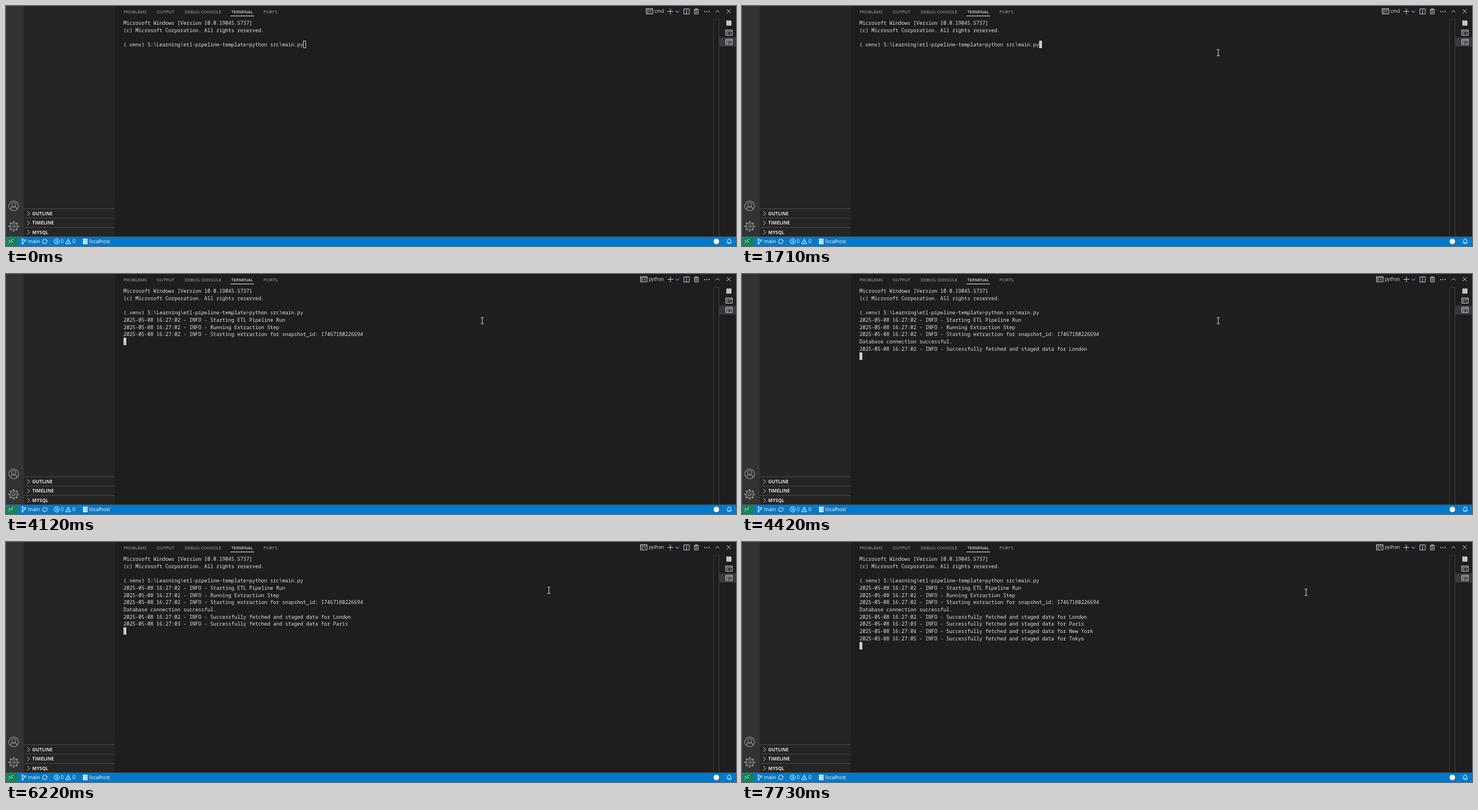
An HTML page that plays this animation: 1280x422 px, repeating every 8 s.

```html
<!DOCTYPE html>
<html lang="en">
<head>
<meta charset="utf-8">
<title>Terminal run</title>
<style>
html, body { margin: 0; width: 100%; height: 100%; overflow: hidden; background: #1e1e1e; }
svg { display: block; width: 100vw; height: 100vh; }
text { font-family: "Open Sans", "Noto Sans", sans-serif; }
.mono text { font: 500 8.75px "Noto Sans Mono", monospace; fill: #e2e2e2; white-space: pre; }
.tabs { font-size: 7.9px; fill: #adadad; }
.sections { font-size: 8.1px; font-weight: 700; fill: #dcdcdc; }
.status { font-size: 8.7px; fill: #fff; }
.line { fill: none; stroke: #d0d0d0; stroke-width: 1; }
.white { stroke: #fff; }
.dim { stroke: #8c8c8c; stroke-width: 1.3; }
</style>
</head>
<body>
<svg viewBox="0 0 1280 422" preserveAspectRatio="none">
  <defs>
    <g id="console" class="line">
      <path d="M.5 .5H12V10H.5ZM.5 2.8H12"/>
      <path d="M4.8 5H2.8V8H4.8M6.3 5V6M6.3 7.2V8.2M7.8 4.6L9.6 8.4" stroke-width=".9"/>
    </g>
    <path id="down" d="M-3 -1.5L0 1.5L3 -1.5"/>
    <path id="right" d="M-2 -3.8L1.8 0L-2 3.8"/>
  </defs>

  <rect width="1280" height="422" fill="#1e1e1e"/>
  <rect width="31.5" height="406" fill="#333"/>
  <rect x="31.5" width="159.5" height="406" fill="#252526"/>
  <path d="M31.5 356.5H191M31.5 373H191M31.5 389.5H191" class="line" style="stroke:#4a4a4b"/>

  <g class="line dim">
    <circle cx="13.5" cy="351.5" r="8.6"/>
    <circle cx="13.5" cy="349" r="3.6"/>
    <path d="M7.6 357.8C8.5 351.4 18.5 351.4 19.4 357.8"/>
    <circle cx="13.5" cy="387.5" r="6.2"/>
    <circle cx="13.5" cy="387.5" r="2.4"/>
    <circle cx="13.5" cy="387.5" r="7.9" stroke-width="2.4" pathLength="16" stroke-dasharray="1" stroke-dashoffset=".5"/>
  </g>

  <g class="sections">
    <text x="46" y="368">OUTLINE</text>
    <text x="46" y="384.4">TIMELINE</text>
    <text x="46" y="401">MYSQL</text>
  </g>
  <g class="line">
    <use href="#right" x="39.5" y="365"/>
    <use href="#right" x="39.5" y="381.5"/>
    <use href="#right" x="39.5" y="398"/>
  </g>

  <g class="tabs">
    <text x="206" y="12.6">PROBLEMS</text>
    <text x="264" y="12.6">OUTPUT</text>
    <text x="313" y="12.6">DEBUG CONSOLE</text>
    <text x="395" y="12.6" fill="#fff">TERMINAL</text>
    <text x="451.5" y="12.6">PORTS</text>
  </g>
  <rect x="393.5" y="17" width="41.5" height="1" fill="#e7e7e7"/>

  <rect x="1250.5" y="55" width="29.5" height="16.5" fill="#37373d"/>
  <path d="M1240.5 406V23.5H1250.5V406" class="line" style="stroke:#3a3a3a"/>

  <use id="shellIcon" href="#console" y="4"/>
  <text id="shellName" y="12.4" font-size="8.2" fill="#dcdcdc"></text>
  <g class="line">
    <path d="M1165 4.5V14.5M1160 9.5H1170"/>
    <use href="#down" x="1177" y="9.7"/>
    <path d="M1188.5 5H1198V14H1188.5ZM1193.3 5V14" stroke="#cfc8e8"/>
    <path d="M1206 6.5H1215M1208.8 6.5V4.8H1212.2V6.5M1207.2 6.5V14H1213.8V6.5M1209.5 8.5V12M1211.5 8.5V12"/>
    <path d="M1244 11.2L1247.5 7.7L1251 11.2"/>
    <path d="M1263.7 5.7L1270.7 12.7M1270.7 5.7L1263.7 12.7"/>
  </g>
  <g fill="#c5c5c5">
    <circle cx="1225" cy="9.7" r="1"/><circle cx="1229" cy="9.7" r="1"/><circle cx="1233" cy="9.7" r="1"/>
    <rect x="1263" y="25.5" width="9" height="9"/>
  </g>
  <use href="#console" x="1261.5" y="41.5"/>
  <use href="#console" x="1261.5" y="58"/>

  <rect y="405.5" width="1280" height="16.5" fill="#007acc"/>
  <rect y="405.5" width="21" height="16.5" fill="#16825d"/>
  <g class="line white">
    <path d="M4.8 411.8L7.6 414.5L4.8 417.3M12 409.8L9.2 412.5L12 415.3"/>
    <circle cx="29" cy="410.5" r="1.4"/><circle cx="29" cy="417.5" r="1.4"/><circle cx="33.5" cy="412" r="1.4"/>
    <path d="M29 412V416M33.5 413.5C33.5 415.5 29 414.5 29 416"/>
    <path d="M64.3 413A4 4 0 0 1 71.8 412.6M71.8 415A4 4 0 0 1 64.3 415.4M70 413H73M63 415H66"/>
    <circle cx="89" cy="414" r="4.4"/>
    <path d="M87.2 412.2L90.8 415.8M90.8 412.2L87.2 415.8"/>
    <path d="M109 409.8L113.6 418H104.4ZM109 412.5V415.3M109 416V417"/>
    <path d="M1264.3 416.5H1272L1270.9 414.5V412.5A2.7 2.7 0 0 0 1265.4 412.5V414.5ZM1267 418H1269.4"/>
  </g>
  <rect x="135" y="409.2" width="8" height="9.6" rx=".6" fill="#fff"/>
  <path d="M138.5 410.9H142M138.5 414H142M138.5 417.1H142M135 412.5H143M135 415.5H143" stroke="#007acc" stroke-width=".5"/>
  <circle cx="1245.5" cy="414" r="4.8" fill="#fff"/>
  <g class="status">
    <text x="38.8" y="417.2">main</text>
    <text x="96" y="417.2">0</text>
    <text x="116.8" y="417.2">0</text>
    <text x="146" y="417.2">localhost</text>
  </g>

  <g id="screen" class="mono"></g>
  <rect id="caret"/>
  <path id="beam" d="M-2.5 -5.5H-.8L0 -5L.8 -5.5H2.5M0 -5V5M-2.5 5.5H-.8L0 5L.8 5.5H2.5" class="line" style="stroke:#e8e8e8"/>
  <path id="arrow" d="M0 0V10.5L2.4 8.3L4 12L5.6 11.3L4 7.7H7.4Z" fill="#fff" stroke="#000" stroke-width=".6"/>
</svg>
<script>
const LOOP = 8000, LEFT = 206, TOP = 23, PITCH = 12.74, CHAR = 5.25;
const ENTER = 3210, FOCUS = 1610, RENAME = 4120;
const $ = id => document.getElementById(id);
const set = (el, attrs) => { for (const k in attrs) el.setAttribute(k, attrs[k]); };
const info = (sec, msg) => `2025-05-08 16:27:0${sec} - INFO - ${msg}`;
const fetched = (sec, city) => info(sec, `Successfully fetched and staged data for ${city}`);

const command = String.raw`(.venv) S:\Learning\etl-pipeline-template>python src\main.py`;
const lines = [
  [0, "Microsoft Windows [Version 10.0.19045.5737]"],
  [0, "(c) Microsoft Corporation. All rights reserved."],
  [0, ""],
  [0, command],
  [4020, info(2, "Starting ETL Pipeline Run")],
  [4020, info(2, "Running Extraction Step")],
  [4020, info(2, "Starting extraction for snapshot_id: 17467180226694")],
  [4220, "Database connection successful."],
  [4420, fetched(2, "London")],
  [5520, fetched(3, "Paris")],
  [6530, fetched(4, "New York")],
  [7730, fetched(5, "Tokyo")]
].map(([at, content], i) => {
  const el = document.createElementNS("http://www.w3.org/2000/svg", "text");
  set(el, { x: LEFT, y: TOP + 9.8 + i * PITCH });
  el.textContent = content;
  $("screen").append(el);
  return { at, el };
});

// Pointer positions, held until the next one.
const pointer = [];
function glide(start, end, steps, from, to, ease = p => p) {
  for (let i = 0; i < steps; i++) {
    const p = i / (steps - 1), e = ease(p);
    pointer.push([Math.round(start + (end - start) * p),
      from[0] + (to[0] - from[0]) * e, from[1] + (to[1] - from[1]) * e]);
  }
}
glide(390, 1100, 8, [1225, 407.5], [838, 95], p => 1 - (1 - p) ** 2);
glide(1200, 1400, 3, [838, 91], [835, 82]);
glide(1610, 1710, 2, [838.5, 84], [835, 82]);
glide(5820, 6020, 3, [852, 82], [934, 84]);
glide(6220, 6530, 4, [952, 85], [989, 88.5]);

function render(t) {
  let shown = 0;
  for (const { at, el } of lines) {
    const on = t >= at;
    el.style.display = on ? "" : "none";
    shown += on;
  }

  const row = t < ENTER ? 3 : shown;
  const col = t < ENTER ? command.length : 0;
  const x = Math.round(LEFT + col * CHAR), y = Math.round(TOP + row * PITCH);
  set($("caret"), t < FOCUS
    ? { x: x + .5, y: y + .5, width: 4, height: 12, fill: "none", stroke: "#ccc" }
    : { x, y, width: 5, height: 13, fill: "#ccc", stroke: "none" });

  const python = t >= RENAME;
  set($("shellIcon"), { x: python ? 1112 : 1122 });
  set($("shellName"), { x: python ? 1127 : 1137 });
  $("shellName").textContent = python ? "python" : "cmd";

  const spot = pointer.filter(p => p[0] <= t).pop();
  const overStatus = spot && spot[2] > 405;
  $("beam").style.display = spot && !overStatus ? "" : "none";
  $("arrow").style.display = overStatus ? "" : "none";
  if (spot) {
    const transform = `translate(${spot[1]} ${spot[2]})`;
    set($("beam"), { transform });
    set($("arrow"), { transform });
  }
}

const begin = performance.now();
function tick() {
  render((performance.now() - begin) % LOOP);
  requestAnimationFrame(tick);
}
tick();
</script>
</body>
</html>
```
